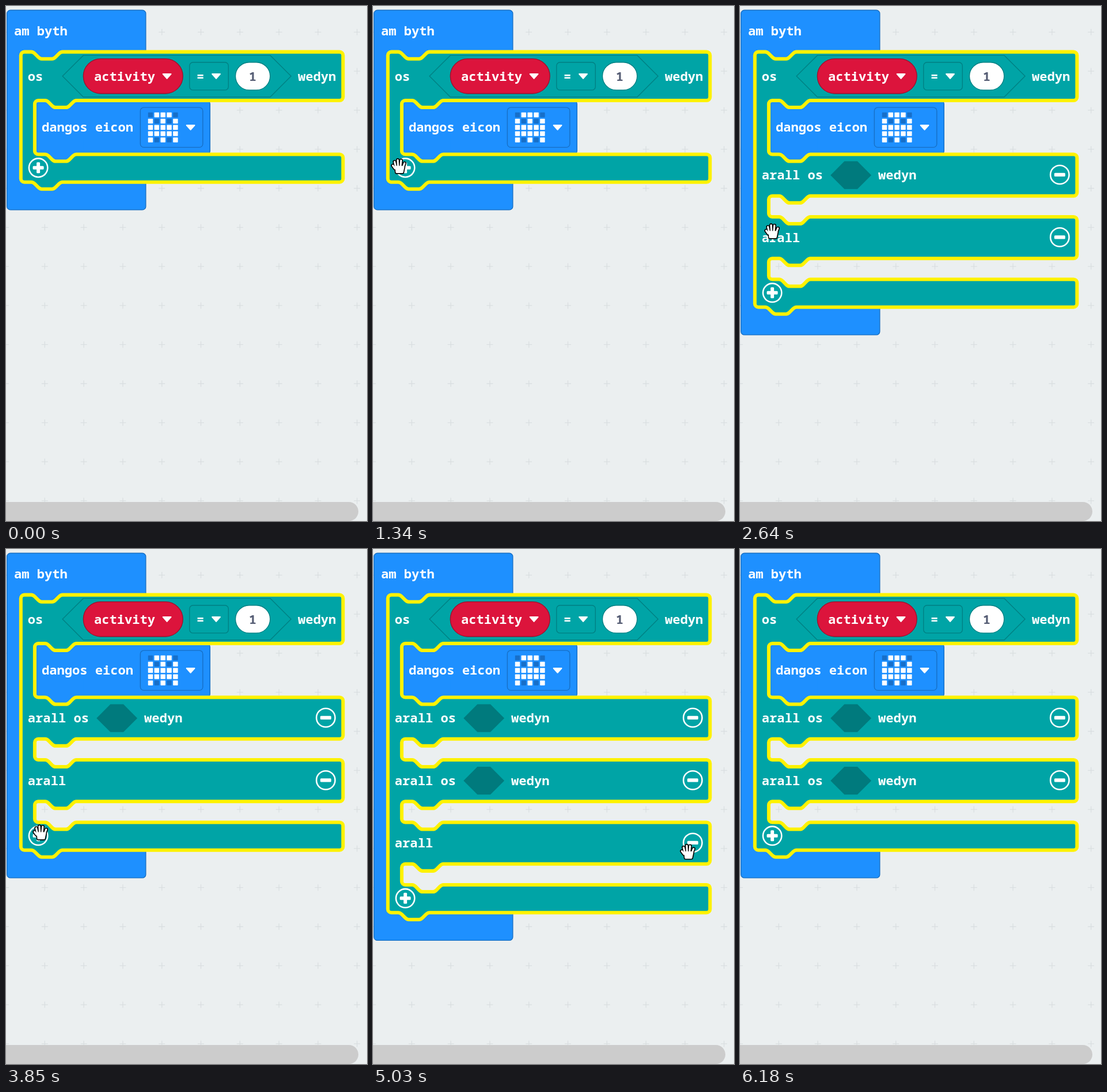
Write an HTML page that moves like this. It is 627 by 894 pixels and loops after 6780 ms.

```html
<!DOCTYPE html>
<html lang="cy">
<head>
<meta charset="utf-8">
<style>
html, body { margin: 0; height: 100%; overflow: hidden; background: #ebeff0; }
svg { display: block; width: 100%; height: 100%; }
text { font: 700 14.667px "Noto Sans Mono", "DejaVu Sans Mono", monospace; fill: #fff; white-space: pre; }
.blue { fill: #1e90ff; stroke: #176fc4; }
.teal { fill: #00a4a6; stroke: #fff200; stroke-width: 4; stroke-linejoin: round; }
.red { fill: #dc143c; stroke: #a00f2c; }
.pill { fill: #fff; stroke: #008083; }
.line { fill: none; stroke: #008083; }
.slot { fill: #007a7d; }
.ring { fill: none; stroke: #fff; stroke-width: 1.7; }
.white { fill: #fff; }
.blue, .red, .pill, .line { stroke-width: .9; }
#hand path { stroke-linejoin: round; stroke-linecap: round; }
</style>
</head>
<body>
<svg viewBox="0 0 627 894">
  <path id="grid" stroke="#dadfe1" stroke-width="1.3"/>
  <rect x="-30" y="861" width="642" height="33" rx="16.5" fill="#ccc"/>
  <g id="blocks" transform="translate(1.7 7.3) scale(1.507)"></g>
  <g id="hand"></g>
</svg>
<script>
const LOOP = 6780, TICK = 70, HIDE = 6180;
const $ = id => document.getElementById(id);

// Block layout in editor units
const LEFT = 16, INNER = 32, RIGHT = 387.3, ROW = 48, GAP = 24, FOOT = 32;
const IF_TOP = 48, BODY = 104, BODY_END = 166;

// Start time, number of "arall os" rows, whether "arall" follows
const states = [[0, 0, false], [1420, 0, true], [2640, 1, true], [3920, 2, true], [5780, 2, false]];

// Pointer moves: first step, last step, resting point
const moves = [
  [440, 1070, 45, 291], [1140, 1340, 45, 278],
  [1670, 2020, 61, 416], [2500, 2570, 56, 391],
  [2830, 3450, 83, 515], [3780, 3850, 60, 492],
  [4330, 4960, 544, 525], [5030, 5380, 557, 544], [5580, 5710, 553, 513]
];
const ENTRY = [0, 0, 644, 482];

const notch = d => `c${2 * d},0 ${3 * d},1 ${4 * d},2l${4 * d},4c${d},1 ${2 * d},2 ${4 * d},2` +
  `h${12 * d}c${2 * d},0 ${3 * d},-1 ${4 * d},-2l${4 * d},-4c${d},-1 ${2 * d},-2 ${4 * d},-2`;
const arc = (x, y, sweep = 1) => `a4,4 0 0 ${sweep} ${4 * x},${4 * y}`;
const text = (x, mid, s, attrs = "") => `<text x="${x}" y="${mid + 5.1}" ${attrs}>${s}</text>`;
// Boxes and hexagons are placed by left edge and vertical middle
const box = (cls, x, mid, w, h, r = 4) =>
  `<rect class="${cls}" x="${x}" y="${mid - h / 2}" width="${w}" height="${h}" rx="${r}"/>`;
const hexagon = (cls, x, mid, w, k) =>
  `<path class="${cls}" d="M${x},${mid}l${k},${-k}h${w - 2 * k}l${k},${k} ${-k},${k}h${2 * k - w}z"/>`;
const arrow = (x, mid) =>
  `<path class="white" stroke="#fff" stroke-width="1.3" stroke-linejoin="round" d="M${x - 4.6},${mid - 2.5}h9.2l-4.6,5.2z"/>`;
const button = (x, mid, plus) => `<circle class="ring" cx="${x}" cy="${mid}" r="10.75"/>` +
  box("white", x - 6.3, mid, 12.6, 4, 1) + (plus ? box("white", x - 2, mid, 4, 12.6, 1) : "");

function icon(x, mid) {
  let cells = "";
  for (let j = 0; j < 5; j++)
    for (let i = 0; i < 5; i++) {
      const off = j === 0 ? i % 4 === 0 : j % 3 === 1 && i % 2 === 1;
      cells += `<rect x="${x + 7.2 * i}" y="${mid - 17.2 + 7.2 * j}" width="5.6" height="5.6" rx=".5" fill="${off ? "#176fc9" : "#fff"}"/>`;
    }
  return cells;
}

// Right arm down to `from`, then the notched mouth that ends at `to`
const mouth = (from, to) => `V${from - 4}${arc(-1, 1)}H${INNER + 48}${notch(-1)}H${INNER + 4}${arc(-1, 1, 0)}` +
  `V${to - 4}${arc(1, 1, 0)}H${INNER + 12}${notch(1)}H${RIGHT - 4}${arc(1, 1)}`;

function draw(ifs, hasElse) {
  const rows = ifs + hasElse;
  const bottom = BODY_END + rows * (ROW + GAP) + FOOT;
  let outline = `M${LEFT},${IF_TOP + 4}${arc(1, -1)}H${LEFT + 12}${notch(1)}H${RIGHT - 4}${arc(1, 1)}` + mouth(BODY, BODY_END);
  let labels = "";
  for (let i = 0; i < rows; i++) {
    const y = BODY_END + i * (ROW + GAP), mid = y + ROW / 2;
    outline += mouth(y + ROW, y + ROW + GAP);
    labels += text(24, mid, i < ifs ? "arall os" : "arall") + button(367.4, mid - .5);
    if (i < ifs) labels += hexagon("slot", 103.2, mid, 47, 16) + text(158.2, mid, "wedyn");
  }
  outline += `V${bottom - 4}${arc(-1, 1)}H${LEFT + 48}${notch(-1)}H${LEFT + 4}${arc(-1, -1)}Z`;

  const head = IF_TOP / 2, cond = (IF_TOP + BODY) / 2, body = (BODY + BODY_END) / 2;
  return `<path class="blue" d="M0,4${arc(1, -1)}H156${arc(1, 1)}V${IF_TOP + 9}H${LEFT}V${bottom - 2}H160V${bottom + FOOT - 4}${arc(-1, 1)}H4${arc(-1, -1)}Z"/>` +
    box("blue", INNER, body, 202, BODY_END - BODY) +
    `<path fill="#1e90ff" d="M${INNER + 6},${body}h50V${BODY_END + 10}h-50z"/>` +
    `<path class="teal" d="${outline}"/>` +
    text(8.1, head, "am byth") + text(24, cond, "os") + text(335.3, cond, "wedyn") +
    hexagon("line", 64, cond, 263.4, 24) +
    box("red", 88, cond, 114.7, 40, 20) + text(100.4, cond, "activity") + arrow(184.4, cond) +
    box("line", 210.4, cond, 44.8, 32) + text(218.5, cond, "=") + arrow(241.1, cond) +
    box("pill", 263.3, cond, 40, 32, 16) + text(278.8, cond, "1", 'style="fill:#575e75"') +
    text(40, body, "dangos eicon") +
    box("blue", 153.7, body, 72, 46) + icon(162.6, body) + arrow(211.6, body) +
    labels + button(36.1, bottom - FOOT / 2 - .5, true);
}

// Steps along an arc: x slows down while y speeds up
function handAt(t) {
  const n = moves.findLastIndex(m => t >= m[0]);
  if (n < 0 || t >= HIDE) return null;
  const [start, end, x, y] = moves[n];
  const [, , x0, y0] = moves[n - 1] || ENTRY;
  const steps = Math.round((end - start) / TICK);
  const done = Math.min(steps, Math.floor((t - start) / (end - start) * steps + 1e-6));
  const u = (done + 1) / (steps + 1);
  return [x0 + (x - x0) * (1 - (1 - u) ** 1.4), y0 + (y - y0) * u * u];
}

let grid = "";
for (let x = -.5; x < 640; x += 67.8)
  for (let y = 45.3; y < 860; y += 67.8)
    grid += `M${x - 5.5},${y}h11M${x},${y - 5.5}v11`;
$("grid").setAttribute("d", grid);

// Thumb and four fingers spread from the palm
const tips = [[-10.5, -1], [-7.5, -7.5], [-2, -10.5], [3.8, -9.8], [9.8, -5]];
const hand = "M-4,10.5H6L8,1H-5Z" + tips.map(([x, y]) => `M${x},${y}L${x * .65},4`).join("");
$("hand").innerHTML = [["#000", 6.4], ["#fff", 3.2]].map(([c, w]) =>
  `<path d="${hand}" fill="${c}" stroke="${c}" stroke-width="${w}"/>`).join("");

let shown;
function frame(t) {
  const state = states.findLast(s => t >= s[0]);
  if (state !== shown) {
    shown = state;
    $("blocks").innerHTML = draw(state[1], state[2]);
  }
  const p = handAt(t);
  $("hand").setAttribute("visibility", p ? "visible" : "hidden");
  if (p) $("hand").setAttribute("transform", `translate(${p})`);
}

const begin = performance.now();
function tick() {
  frame((performance.now() - begin) % LOOP);
  requestAnimationFrame(tick);
}
tick();
</script>
</body>
</html>
```
